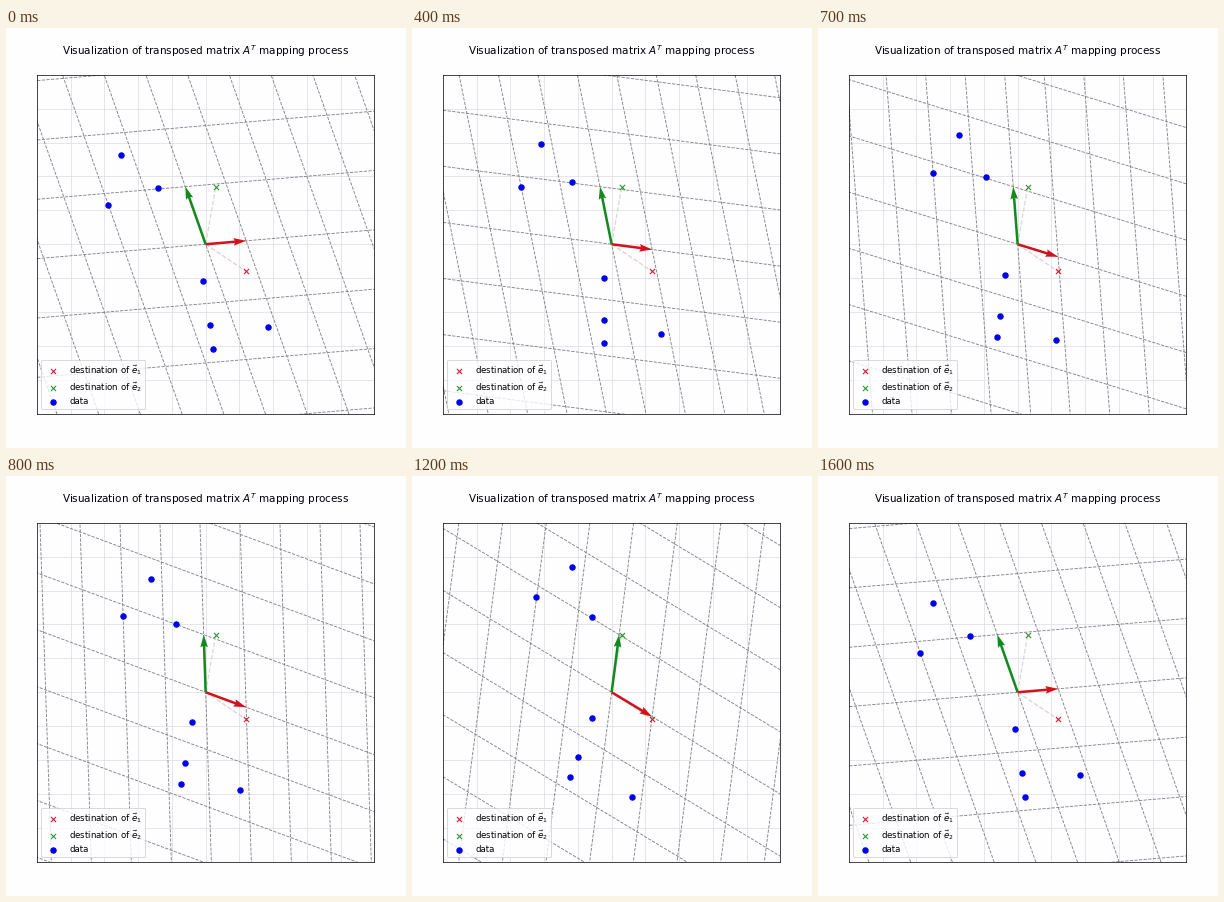
A matplotlib script for the animation above (1700 ms loop, 400 px wide and 420 px high).

```python
import numpy as np
import matplotlib.pyplot as plt
from matplotlib.animation import FuncAnimation
from matplotlib.collections import LineCollection

W, H, DPI = 400, 420, 64
FRAMES, CYCLE = 17, 16
PAPER = "#fefdff"
RED, GREEN = "#d0141e", "#148a1e"

A = np.array([[1.2, -0.8], [0.3, 1.7]])
POINTS = np.array([
    (-1.28, 1.625), (-2.011, 0.807), (-0.678, 1.014), (-0.371, -0.612),
    (-0.584, -1.374), (0.785, -1.49), (-0.7, -1.77),
])

# Progress of the morph from A to its transpose, by step of the cycle
STEPS = [0, 3, 5, 8, 11, 13, 16]
PROGRESS = [0, 0.18, 0.29, 0.475, 0.675, 0.785, 1]

plt.rcParams.update({"font.family": "DejaVu Sans", "axes.linewidth": 0.8})


def lattice(reach=10):
    """Unit grid lines as an array of (start, end) pairs."""
    k = np.arange(-reach, reach + 1)
    far = np.full_like(k, reach)
    across = np.stack([np.column_stack([-far, k]), np.column_stack([far, k])], axis=1)
    return np.concatenate([across, across[:, :, ::-1]])


def matrix_at(frame):
    t = np.interp((frame + 3) % CYCLE, STEPS, PROGRESS)
    return (1 - t) * A + t * A.T


LINES = lattice()

fig = plt.figure(figsize=(W / DPI, H / DPI), dpi=DPI, facecolor=PAPER)
left, right, top, bottom = 30.9, 368.4, 46.8, 385.7
ax = fig.add_axes([left / W, 1 - bottom / H, (right - left) / W, (bottom - top) / H],
                  facecolor=PAPER)
ax.set(xticks=[], yticks=[])
fig.text(0.5, 1 - 26.8 / H, "Visualization of transposed matrix $A^T$ mapping process",
         fontsize=11.72, ha="center", va="baseline")

for k in range(-4, 5):
    ax.axhline(k, color="#dedede", lw=0.8, zorder=0.5)
    ax.axvline(k, color="#dedede", lw=0.8, zorder=0.5)

grid = LineCollection([], colors="#808080", linewidths=0.98, linestyles="--", zorder=1)
ax.add_collection(grid, autolim=False)

for (x, y), tint in zip(A, ("#e2cfcb", "#d2decd")):
    ax.plot([0, x], [0, y], "--", color=tint, lw=1.4, zorder=1.5)

for (x, y), color, n in zip(A, ("#cc1a22", "#1e9a26"), (1, 2)):
    ax.scatter(x, y, s=34, marker="x", color=color, linewidths=1.2, zorder=2,
               label=rf"destination of $\vec{{e}}_{n}\enspace\,$")

dots = ax.scatter(*POINTS.T, s=34, color="#0000ea", linewidths=1.4, zorder=2.5,
                  label="data")
arrows = ax.quiver([0, 0], [0, 0], *A, color=[RED, GREEN], angles="xy",
                   scale_units="xy", scale=1, width=0.0075, zorder=3)
ax.set(xlim=(-5, 5), ylim=(-5, 5))

legend = ax.legend(loc="lower left", fontsize=9.77, labelspacing=0.38, facecolor=PAPER)
legend.set_zorder(5)


def update(frame):
    m = matrix_at(frame)
    grid.set_segments(list(LINES @ m.T))
    dots.set_offsets(POINTS @ m.T)
    arrows.set_UVC(*m)
    return grid, dots, arrows


anim = FuncAnimation(fig, update, frames=FRAMES, interval=100, repeat=True, blit=False)
plt.show()
```
